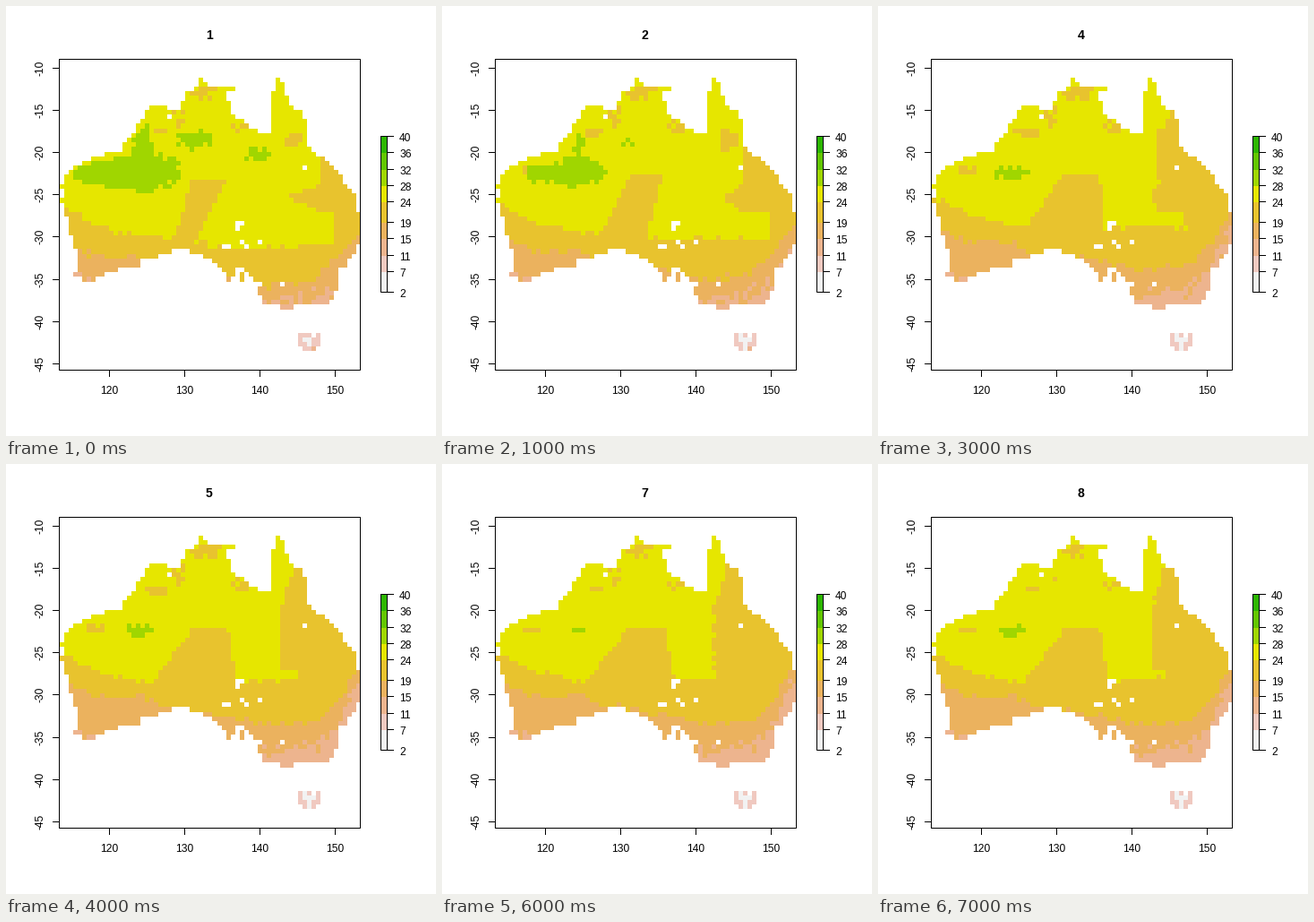
A matplotlib script that plays this animation: 480x480 px, repeating every 8000 ms.

```python
import numpy as np
import matplotlib.pyplot as plt
from matplotlib.animation import FuncAnimation
from matplotlib.colors import to_rgb
from matplotlib.patches import Rectangle
from matplotlib.path import Path

SIZE, MONTHS, CELLS = 480, 8, 67
X0, X1, Y0, Y1 = 59.9, 395.9, 60.3, 406.4
COLORS = ["#F2F2F2", "#F0C9C0", "#EDB48E", "#EBB25E", "#E8C32E",
          "#E6E600", "#A0D600", "#63C600", "#2DB600"]
BREAKS = [2, 7, 11, 15, 19, 24, 28, 32, 36, 40]
ICE, PALE, PINK, ORANGE, GOLD, YELLOW, GREEN = range(7)

plt.rcParams["font.family"] = "Liberation Sans"
plt.rcParams["path.snap"] = False

# Cell centres in stage pixels
step = (np.arange(CELLS) + 0.5) / CELLS
gx, gy = np.meshgrid(X0 + step * (X1 - X0), Y0 + step * (Y1 - Y0))
centres = np.column_stack([gx.ravel(), gy.ravel()])
rng = np.random.default_rng(4)
grain = rng.uniform(-1, 1, gx.shape)
speckle = rng.uniform(-1, 1, gx.shape)


def inside(points):
    return Path(points).contains_points(centres).reshape(gx.shape)


def cells_at(points):
    return np.any([(abs(gx - x) < 2.6) & (abs(gy - y) < 2.6)
                   for x, y in points], axis=0)


# Coastline, clockwise from the north-west cape
north = [(64, 190), (76, 181), (104, 167), (128, 162), (148, 133), (156, 121),
         (166, 110), (180, 110), (182, 118), (195, 114), (201, 98), (214, 93),
         (214, 81), (221, 81), (225, 90), (255, 92), (255, 98), (246, 99),
         (251, 124), (262, 127), (285, 145), (296, 142), (296, 104),
         (301, 80)]
east = [(306, 80), (312, 102), (322, 118), (329, 116), (337, 140), (337, 155),
        (372, 190), (381, 203), (391, 211), (391, 232), (397, 234),
        (397, 260), (380, 290), (372, 294), (371, 313), (364, 330)]
south = [(345, 336), (321, 335), (321, 341), (306, 341), (305, 335),
         (286, 335), (281, 314), (271, 303), (266, 292), (256, 291),
         (251, 307), (246, 307), (246, 300), (232, 285), (213, 275),
         (190, 274), (150, 285), (150, 294), (115, 296), (100, 306),
         (85, 306), (75, 299), (81, 293), (80, 277), (70, 250), (64, 222)]
islets = [(62, 203), (62, 219), (264, 299), (264, 304)]
lakes = [(183, 123), (334, 180), (258, 243), (264, 243), (258, 249),
         (264, 264), (284, 264), (243, 269), (248, 269), (269, 269),
         (284, 310), (309, 310)]
tasmania = [(326, 364), (341, 364), (341, 369), (346, 369), (346, 364),
            (352, 364), (352, 380), (341, 386), (332, 386), (326, 375)]

island = inside(tasmania)
land = (inside(north + east + south) | cells_at(islets)) & ~cells_at(lakes)

# Northern limit of each cooler band: heights over x, in January and July
knots = [60, 100, 150, 175, 240, 290, 340, 366, 395]
OFF = 400
bands = [
    (GOLD, 3, [221, 247, 259, 257, 270, 272, 270, 266, 266],
     [208, 230, 243, 244, 244, 238, 240, 240, 240]),
    (ORANGE, 4, [268, 279, 281, 300, 302, 314, 307, 281, 255],
     [234, 261, 258, 270, 278, 289, 290, 270, 226]),
    (PINK, 11, [300, 310, OFF, OFF, OFF, 332, 326, 318, 285],
     [285, 303, OFF, OFF, OFF, 319, 318, 300, 238]),
]
# Warm and cool centres: x, y, width, height, strength
hot_spots = [(150, 187, 48, 21, 1), (153, 150, 13, 20, 0.65),
             (92, 188, 25, 14, 0.45), (212, 151, 30, 14, 0.62),
             (280, 168, 24, 13, 0.55)]
cool_spots = [(222, 98, 19, 10, 1), (194, 126, 9, 14, 0.9),
              (168, 140, 15, 9, 0.8), (258, 136, 18, 9, 0.8),
              (320, 152, 11, 15, 1), (100, 186, 12, 7, 0.9)]


def bumps(spots):
    return sum(a * np.exp(-((gx - x) / w) ** 2 - ((gy - y) / h) ** 2)
               for x, y, w, h, a in spots)


heat, chill = bumps(hot_spots), bumps(cool_spots)


def central_ranges(s):
    """Cool wedge in the middle that widens towards winter."""
    top = 195 - 10 * s
    depth = gy - top
    left = 208 - depth * (0.3 + 0.5 * s)
    right = 244 + 4 * s + depth * (0.65 * s - 0.45)
    return (depth > 0) & (gx > left) & (gx < right)


def eastern_highlands(s):
    """Cool east whose edge moves inland towards winter."""
    edge = np.where(gy > 230, 366 - 60 * s ** 4, 350 - 48 * s)
    edge = edge - 32 * (1 - s) * np.exp(-((gy - 214) / 9) ** 2)
    return gx + 2 * grain > edge + 0.3 * np.maximum(0, 165 - gy)


def classes(month):
    s = 1 - ((month - 6.6) / 5.6) ** 2
    c = np.full(gx.shape, YELLOW)
    c[chill + 0.3 * speckle > 0.55 + 0.012 * (month - 4) ** 2] = GOLD
    c[central_ranges(s) | eastern_highlands(s)] = GOLD
    c[heat + 0.1 * grain > 0.42 + 0.62 * s] = GREEN
    for band, rough, summer, winter in bands:
        limit = np.interp(gx, knots, np.array(summer) * (1 - s)
                          + np.array(winter) * s)
        c[gy + rough * grain > limit] = band
    away = np.hypot(gx - 338, gy - 374) + 3 * grain - 2 * s
    c[island] = np.digitize(-away, [-11, -6])[island]
    c[island] = PINK - c[island]
    return c


palette = np.array([to_rgb(c) for c in COLORS])


def picture(month):
    rgb = palette[classes(month)]
    rgb[~(land | island)] = 1
    return rgb


pictures = [picture(m) for m in range(1, MONTHS + 1)]

fig = plt.figure(figsize=(SIZE / 72, SIZE / 72), dpi=72, facecolor="white")
ax = fig.add_axes([0, 0, 1, 1])
ax.axis("off")
raster = ax.imshow(pictures[0], extent=(X0, X1, Y1, Y0), aspect="auto",
                   interpolation="nearest")
ax.set_xlim(0, SIZE)
ax.set_ylim(SIZE, 0)


def crisp(v):
    return np.floor(v) + 0.5


def line(xs, ys):
    ax.plot(xs, ys, color="black", lw=1, solid_capstyle="butt", zorder=4)


def label(x, y, s, **kw):
    return ax.text(x, y, s, **{"fontsize": 12, "ha": "center",
                               "va": "center_baseline", **kw})


def frame(x, y, w, h):
    ax.add_patch(Rectangle((x, y), w, h, fill=False, ec="black", lw=1,
                           zorder=4))


def key_y(v):
    return 319.5 - (v - 2) * 174 / 38


frame(59.5, 59.5, 336, 347)
for lon in range(120, 151, 10):
    x = crisp(115.2 + (lon - 120) * 8.4)
    line([x, x], [406, 414])
    label(x - 0.5, 428.5, str(lon))
for lat in range(-10, -46, -5):
    y = crisp(69.3 - (lat + 10) * 9.43)
    line([52, 60], [y, y])
    label(39, y - 0.5, str(lat), rotation=90, va="center")

# Colour key
for lo, hi, color in zip(BREAKS, BREAKS[1:], COLORS):
    ax.add_patch(Rectangle((418.5, key_y(hi)), 7, key_y(lo) - key_y(hi),
                           fc=color, lw=0, antialiased=False))
for v in BREAKS:
    line([425, 433], [crisp(key_y(v))] * 2)
    label(439, key_y(v) + 1, str(v), ha="left")
frame(418.5, 145.5, 7, 174)

title = label(226.5, 31.5, "1", fontsize=14, fontweight="bold")


def update(i):
    raster.set_data(pictures[i])
    title.set_text(str(i + 1))
    return raster, title


anim = FuncAnimation(fig, update, frames=MONTHS, interval=1000, repeat=True,
                     repeat_delay=0, blit=False)
plt.show()
```
